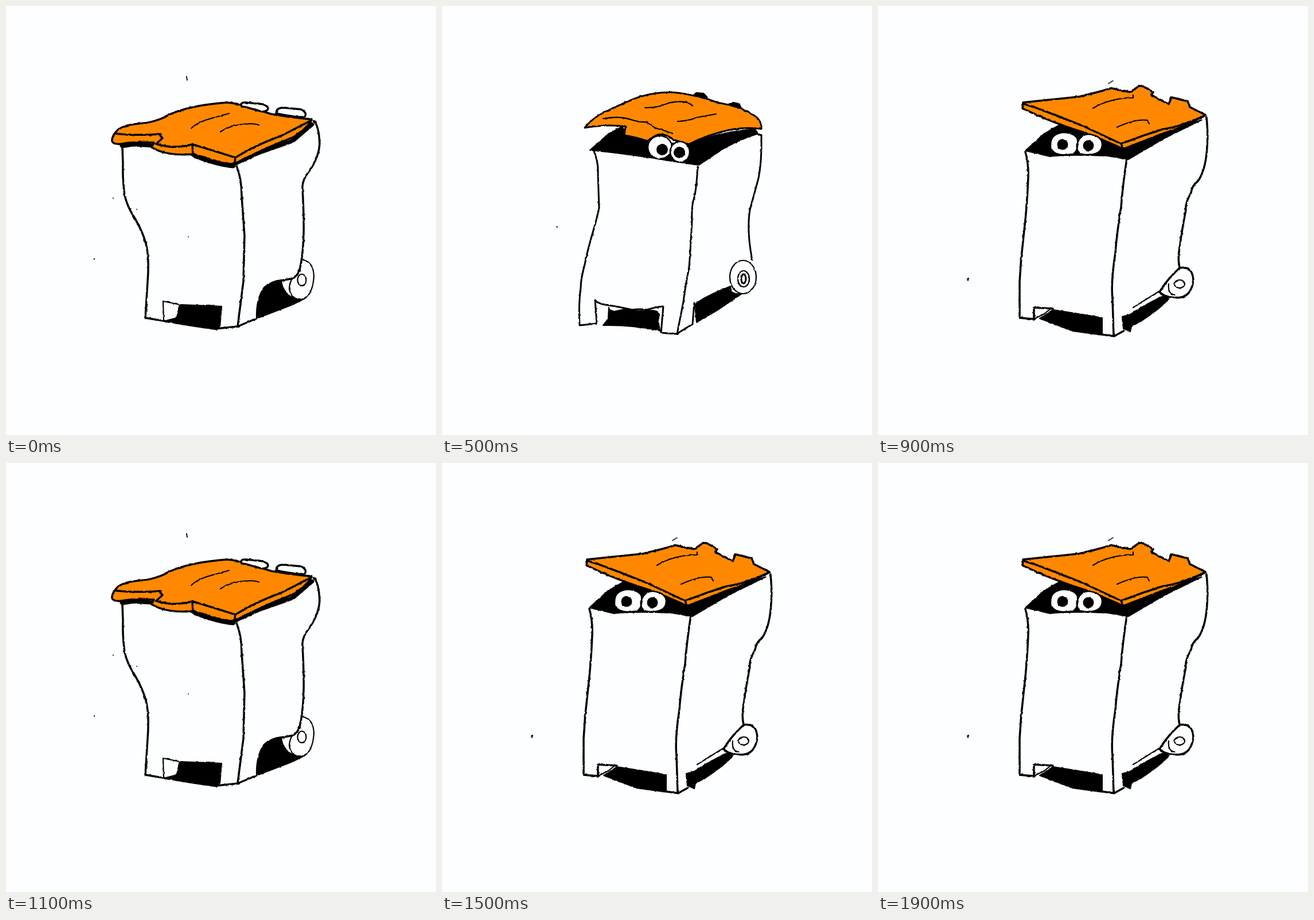
Animation, 750 px wide and 747 px high, one loop 2000 ms. Source, as an HTML page without scripts:

```html
<!DOCTYPE html>
<html lang="en">
<head>
<meta charset="utf-8">
<title>Peeking bin</title>
<style>
  html, body { margin: 0; width: 100%; height: 100%; overflow: hidden; background: #fdfeff; }
  svg { display: block; width: 100%; height: 100%; }
  .pose {
    fill: none; stroke: #000; stroke-width: 3.5;
    stroke-linecap: round; stroke-linejoin: round;
    visibility: hidden; animation: 2s step-end infinite;
  }
  .ink { fill: #000; stroke-width: 2; }
  .lid { fill: #ff8800; }
  .paper { fill: #fdfeff; }
  .thin { stroke-width: 2.2; }
  .bold { stroke-width: 7; }
  .speck { stroke-width: 1.8; }
  .faint { stroke: #ccc; stroke-width: 1.2; }
  .eye { fill: #fff; stroke-width: 2.6; }

  #shut { animation-name: shut; }
  #peek { animation-name: peek; stroke-width: 3; }
  #wide { animation-name: wide; }
  #tilt { animation-name: tilt; }

  /* One step is 5% of the loop */
  @keyframes shut {
    0%, 20%, 40%, 55%, 70%, 85% { visibility: visible; }
    5%, 25%, 45%, 60%, 75%, 90% { visibility: hidden; }
  }
  @keyframes peek {
    5%, 25%, 65%, 90% { visibility: visible; }
    0%, 10%, 30%, 70%, 95% { visibility: hidden; }
  }
  @keyframes tilt {
    10%, 30%, 45%, 60%, 75%, 95% { visibility: visible; }
    0%, 15%, 35%, 50%, 65%, 80% { visibility: hidden; }
  }
  @keyframes wide {
    15%, 35%, 50%, 80% { visibility: visible; }
    0%, 20%, 40%, 55%, 85% { visibility: hidden; }
  }
</style>
</head>
<body>
<svg viewBox="0 0 750 747">
  <defs>
    <!-- Rough pen edge -->
    <filter id="rough" filterUnits="userSpaceOnUse" x="0" y="0" width="750" height="747" color-interpolation-filters="sRGB">
      <feTurbulence type="fractalNoise" baseFrequency=".16" numOctaves="2" seed="4"/>
      <feDisplacementMap in="SourceGraphic" scale="2.6" xChannelSelector="R" yChannelSelector="G"/>
    </filter>
  </defs>

  <g filter="url(#rough)">
    <g id="shut" class="pose">
      <path d="M203 247L204 275Q203 300 207 330Q212 350 222 365Q240 395 245 418Q250 440 247 480L243 543L280 549L366 562L404 558L437 544"/>
      <path d="M402 279Q411 300 411 330L416 400L414 480L404 558"/>
      <path d="M537 200Q546 210 547 240Q546 262 530 286Q517 302 517 315Q520 370 519 400Q518 435 512 460Q507 473 497 475L480 478"/>
      <path class="ink" d="M303 520L376 523L373 560L366 563L330 558L275 549L298 543Z"/>
      <path d="M275 548L274 514L303 520L298 543" class="thin"/>
      <path class="ink" d="M437 542Q436 510 450 490Q462 479 480 477L482 492Q490 508 516 512L500 520L440 543Z"/>
      <path class="thin" d="M518 442Q537 446 537 472Q534 508 514 512Q497 510 494 492Q495 480 500 474M480 480Q484 500 500 508"/>
      <ellipse class="thin" cx="516" cy="477" rx="7.5" ry="10"/>

      <path class="bold" d="M202 244L222 241L255 243M328 261Q370 277 396 279M400 274L440 256L500 235L534 206"/>
      <path class="lid" d="M185 236Q184 228 192 219Q200 208 230 205Q262 203 285 189Q320 173 385 168Q400 169 422 175L462 188Q495 194 533 197Q531 208 500 229Q450 248 398 275Q380 276 355 266L326 258Q280 262 254 246L258 238Q225 236 208 239Q190 243 185 236Z"/>
      <path d="M190 222Q220 226 270 223M268 224L273 230L262 240Q290 250 325 241Q350 248 400 264Q440 240 480 226L533 199M325 241L326 259M400 264L398 279"/>
      <path class="thin" d="M323 213Q330 205 350 198L389 187M374 219Q388 210 405 207Q430 203 440 207"/>
      <path class="paper" d="M411 175Q408 167 418 168L448 171Q460 176 456 181Q450 186 440 182L418 176ZM471 186Q472 177 484 177L515 180Q526 186 521 193Q510 195 471 187Z"/>
      <path class="speck" d="M315 124l1 5M187 335h0M228 354h0M318 402h0M153 440l1 1"/>
      <path class="faint" d="M308 151h0M174 619h0"/>
    </g>

    <g id="peek" class="pose">
      <path d="M265 253Q273 272 272 292L274 352Q270 370 264 391Q253 428 249 450Q242 475 242 490Q238 520 240 556L270 553L267 512Q272 518 284 520Q310 524 332 529Q345 527 358 529Q372 524 386 523L382 569L409 571L437 554L440 517"/>
      <path d="M446 280Q444 315 440 334Q435 345 436 375Q433 430 431 455Q424 490 421 515L410 571"/>
      <path d="M557 225Q558 270 552 300Q541 340 537 355Q531 390 541 442"/>
      <path class="ink" d="M292 529L300 532L318 528L340 531L372 530L379 537L377 548L380 565Q330 555 281 556L291 544Z"/>
      <path class="thin" d="M291 525L290 544"/>
      <path class="ink" d="M441 520Q455 507 503 488L505 498Q515 503 523 501L480 530L444 551Z"/>
      <ellipse class="paper thin" cx="525" cy="472" rx="23" ry="29"/>
      <ellipse class="thin" cx="526" cy="475" rx="10" ry="14"/>
      <ellipse cx="526" cy="475" rx="4" ry="8"/>

      <path class="ink" d="M258 251L290 223L314 210L322 222L358 236L430 241Q470 222 545 214L552 222Q520 232 490 249L448 277L400 270Q330 258 258 251Z"/>
      <path d="M540 219L557 225"/>
      <path class="ink" d="M438 156L444 151L456 152L463 159L450 158ZM500 172L508 168L518 170L522 178L510 176Z"/>
      <path class="lid" d="M249 212Q262 195 285 184Q325 165 345 158Q380 148 410 151Q450 156 480 168Q520 175 540 188Q558 197 557 214Q530 210 500 216Q460 225 430 241L404 233Q385 218 370 227L358 235Q340 229 318 225L320 210Q290 205 249 212Z"/>
      <path class="thin" d="M281 196Q310 191 330 198Q345 203 358 202Q370 214 385 216L402 222M354 177Q375 178 395 169Q425 162 437 174M411 201Q430 200 445 194L478 188"/>
      <g class="eye"><ellipse cx="380" cy="246" rx="21" ry="20"/><ellipse cx="415" cy="254" rx="17" ry="18"/></g>
      <g class="ink"><circle cx="384" cy="250" r="9"/><circle cx="414" cy="255" r="9"/></g>
      <path class="speck" d="M199 384.5h2"/>
      <path class="faint" d="M445 363h0"/>
    </g>

    <g id="wide" class="pose">
      <path d="M251 238Q253 260 248 290L246 328Q249 338 258 345Q262 380 261 420L262 480L257 540L250 552L255 558L282 549"/>
      <path d="M455 242Q453 270 445 300Q443 330 437 345Q429 370 430 410Q425 450 428 490L425 530L433 568"/>
      <path d="M550 192Q550 220 544 255L538 315Q534 328 524 331Q523 345 526 380Q530 420 528 455Q525 470 516 483Q500 495 487 499Q465 505 451 518L449 545"/>
      <path class="ink" d="M310 535L345 531L370 535L376 530L390 530L394 546L405 552L402 565L345 566L272 568L273 558L308 549Z"/>
      <path class="thin" d="M345 532Q300 528 282 531L292 548L305 545L310 533M390 531L402 535L404 565L425 569L437 567"/>
      <path class="ink" d="M456 516L488 498L497 516L512 520L480 543L442 562L434 568L438 558L455 545Z"/>
      <path class="paper thin" d="M530 464Q549 466 550 488Q545 512 520 515Q505 508 505 490Q516 484 530 464Z"/>
      <path class="thin" d="M490 496Q492 512 500 516L530 518L535 512"/>
      <ellipse class="thin" cx="531" cy="489" rx="7" ry="8.5"/>
      <path class="thin" d="M529 486q5 2 1 6"/>

      <path class="ink" d="M252 238L308 200L344 180Q400 180 450 190Q500 180 550 189L455 242Q420 252 380 247Z"/>
      <path class="lid" d="M257 190L258 176Q275 155 300 149Q320 146 338 138Q365 128 395 134Q415 138 422 146Q440 140 470 143Q500 150 520 160Q540 170 545 187Q500 180 450 191Q400 180 344 179Q290 182 257 190Z"/>
      <path d="M258 178Q290 168 340 167Q400 168 452 178Q500 173 545 182M452 178L450 191"/>
      <path class="thin" d="M394 153Q410 150 423 146"/>
      <g class="eye"><ellipse cx="360" cy="217" rx="22" ry="22"/><ellipse cx="409" cy="219" rx="24" ry="24"/></g>
      <g class="ink"><circle cx="357" cy="219" r="8.5"/><circle cx="409" cy="219" r="8.5"/></g>
      <path class="speck" d="M281 350h0M332 485h0"/>
      <path class="faint" d="M358 333h0M332 498h0M285 473h0M543 598h0"/>
    </g>

    <g id="tilt" class="pose">
      <path d="M257 254Q263 275 262 300Q260 350 254 400Q249 440 247 480L247 543L272 545L272 525L305 527"/>
      <path d="M434 266Q427 310 424 350Q416 400 414 430Q406 480 409 510L411 574M391 572L412 575L428 566"/>
      <path d="M573 194Q576 225 574 245Q572 285 558 305Q548 312 546 325Q535 345 537 355Q530 390 527 415Q522 440 526 455"/>
      <path class="ink" d="M282 544L305 529L350 536Q375 540 391 543L391 573L340 566Z"/>
      <path class="thin" d="M272 545L290 536L300 528"/>
      <path class="ink" d="M426 541L440 537Q470 517 500 504L507 510Q495 525 460 548L442 558L440 567L428 562Z"/>
      <path class="thin" d="M445 525L490 497"/>
      <path class="paper" d="M526 456Q549 452 550 478Q546 508 522 508Q500 508 491 498Q505 475 526 456Z"/>
      <path class="thin" d="M507 484Q505 502 518 503"/>
      <ellipse class="thin" cx="526" cy="484" rx="9" ry="7"/>

      <path class="ink" d="M257 252L290 222L318 206L428 246Q470 235 520 214L565 198L500 230L437 267L400 261Q330 258 300 262Z"/>
      <path class="lid" d="M252 178L253 168Q300 163 350 158Q385 150 407 143L424 147L441 150L455 139L463 140L480 150L477 155L507 171L512 159L540 166L544 176L572 190Q530 212 500 221L428 249Q400 236 365 222Q300 202 252 178Z"/>
      <path d="M253 170L275 177Q310 190 360 210L424 240Q460 226 495 215Q530 210 571 190M424 240L428 249"/>
      <path class="thin" d="M375 178Q405 160 445 160L445 155M417 211Q450 196 470 199L473 205"/>
      <g class="eye">
        <path d="M301 241Q301 222 324 220Q345 222 348 232Q350 256 338 258Q301 264 301 241ZM347 241Q352 225 366 223Q392 226 391 242Q390 260 362 259Q345 258 347 241Z"/>
      </g>
      <g class="ink"><circle cx="322" cy="241" r="8.5"/><circle cx="367" cy="243" r="8.5"/></g>
      <path class="speck" d="M156 475l2-1l-1 4"/>
      <path class="thin" stroke="#555" d="M402 135L410 130"/>
    </g>
  </g>
</svg>
</body>
</html>
```
